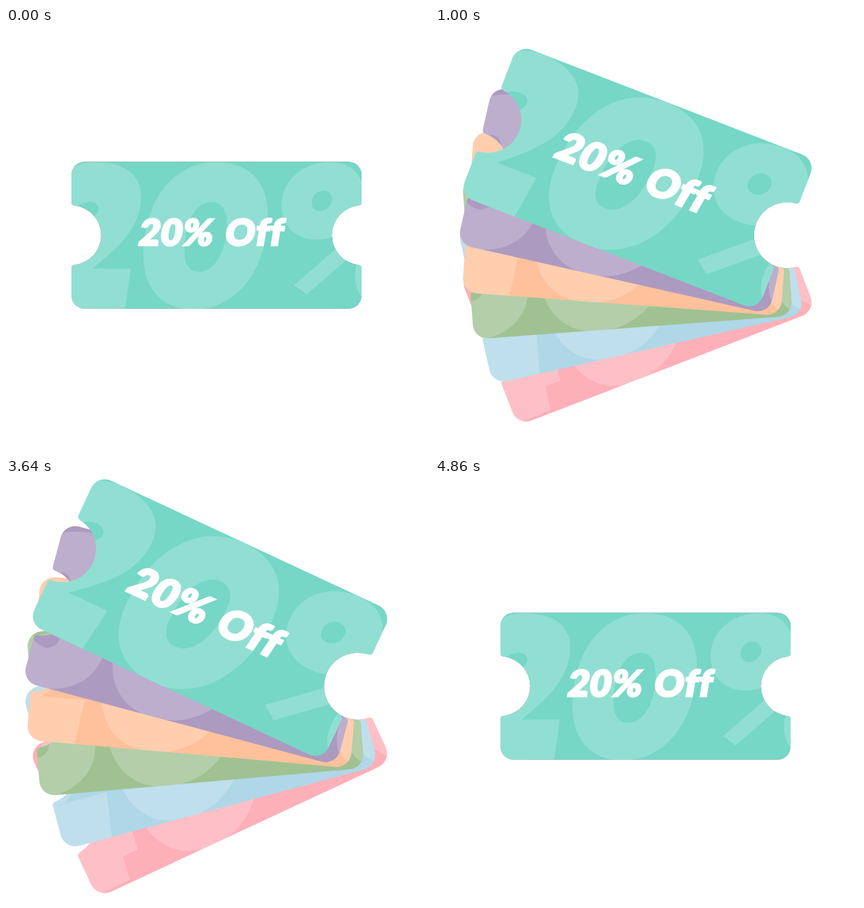
Recreate the animation shown at these times as an HTML page. Size 640 by 640 pixels, loop 6 s.

```html
<!DOCTYPE html>
<html lang="en">
<head>
<meta charset="utf-8">
<title>Coupon fan</title>
<style>
  html, body { margin: 0; width: 100%; height: 100%; overflow: hidden; background: #fff; }
  svg { display: block; width: 100vw; height: 100vh; }
  text {
    font-family: Lato, "Open Sans", sans-serif;
    font-weight: 900;
    font-size: 55px;
    letter-spacing: 1.3px;
    word-spacing: 3px;
    text-anchor: middle;
    text-rendering: geometricPrecision;
    fill: #fff;
    stroke: #fff;
    stroke-width: 2.6px;
    stroke-linejoin: miter;
  }
</style>
</head>
<body>
<svg viewBox="0 0 640 640">
  <defs>
    <path id="ticket" d="M119 202.5H518A20 20 0 0 1 538 222.5V263.5Q538 268 533 268.6
      A45.2 45.2 0 0 0 533 358.4Q538 359 538 363.5V404.5A20 20 0 0 1 518 424.5H119
      A20 20 0 0 1 99 404.5V363.5Q99 359 104 358.4A45.2 45.2 0 0 0 104 268.6Q99 268 99 263.5V222.5
      A20 20 0 0 1 119 202.5Z"/>
    <clipPath id="edge"><use href="#ticket"/></clipPath>
    <path id="two" fill-rule="evenodd" d="M60 250C85 214 108 203 135 203C181 203 204.500 224 204.500 254
      C204.500 305 165 335 131 364H189L180 426H60Z
      M98 276C112 265 120 263 127 263C136 263 140 268 140 273C140 280 134 286 126 293L98 318Z"/>
    <path id="three" fill-rule="evenodd" d="M60 244C90 215 120 206 150 206C182 206 203 222 203 250
      C203 278 190 296 176 304C188 314 196 332 196 355C196 400 160 426 118 426C90 426 70 420 60 412Z
      M102 282A13 14 0 0 1 128 282A13 14 0 0 1 102 282Z
      M94 362C106 372 118 374 124 370C131 366 134 360 133 352C132 340 115 336 94 336Z"/>
    <path id="four" d="M118 203H204L181 345H182L176 388H154L149 421H80V388H60V345Z"/>
    <path id="ring" fill-rule="evenodd" d="M417 268C417 232 448 203 490 203C522 203 541 222 541 252
      C541 290 511 320 470 320C437 320 417 299 417 268Z
      M462.500 264C462.500 254 471 246 481 246C489 246 493.500 251 493.500 259
      C493.500 269 485 277 475 277C467 277 462.500 272 462.500 264Z"/>
    <g id="rest">
      <path fill-rule="evenodd" d="M208 345C208 262 252 203 318 203C367 203 396 232 396 282
        C396 365 349 426 284 426C237 426 208 395 208 345Z
        M270 338C270 298 285 263 311 263C326 263 334 274 334 294C334 335 318 369 292 369
        C277 369 270 358 270 338Z"/>
      <use href="#ring"/>
      <use href="#ring" x="111" y="106"/>
      <path d="M436 389L455 403L600 277L581 263Z"/>
    </g>
  </defs>
  <rect width="640" height="640" fill="#fff"/>
  <g id="fan"></g>
</svg>
<script>
  const LOOP = 6000, STEP = 1000 / 14;
  const START = 394, DURATION = 1220, MIRROR = 5247;
  const PIVOT = { x: 538, y: 313.5 };

  // Back to front: colour, first digit, its shift, shift of the other signs.
  const cards = [
    ["#fdb0b8", "four", 0, -11],
    ["#afd7e8", "two", -15, -14],
    ["#a0c292", "three", -17, -12],
    ["#ffc19b", "two", -16, -14],
    ["#ad9ac0", "three", 0, 0],
    ["#76d7c6", "two", 0, 0]
  ];

  const fan = document.getElementById("fan");
  fan.innerHTML = cards.map(([color, digit, digitX, restX], i) => `
    <g>
      <use href="#ticket" fill="${color}"/>
      <g clip-path="url(#edge)" fill="#fff" fill-opacity=".2">
        <use href="#${digit}" x="${digitX}"/>
        <use href="#rest" x="${restX}"/>
      </g>
      ${i === cards.length - 1 ? '<text transform="translate(308.500 328.700) skewX(-9)">20% Off</text>' : ""}
    </g>`).join("");

  const bezier = (u, a, b) => 3 * (1 - u) * (1 - u) * u * a + 3 * (1 - u) * u * u * b + u * u * u;

  function ease(x) {
    if (x <= 0) return 0;
    if (x >= 1) return 1;
    let low = 0, high = 1;
    for (let i = 0; i < 30; i++) {
      const mid = (low + high) / 2;
      if (bezier(mid, 0, 0.18) < x) low = mid; else high = mid;
    }
    return bezier(low, 0.02, 1);
  }

  // Fourteen pictures a second, each starting on a whole 10 ms.
  function snap(t) {
    let k = Math.floor((t + 5) / STEP);
    if (Math.round(k * STEP / 10) * 10 > t) k--;
    return k * STEP;
  }

  function draw(ms) {
    const t = snap(ms % LOOP);
    const p = ease((Math.min(t, MIRROR - t) - START) / DURATION);
    // The slide to the left runs ahead of the turn.
    const x = PIVOT.x - 6.5 * Math.pow(p, 0.6), scale = 1 + 0.12 * p;
    [...fan.children].forEach((card, i) => {
      const angle = (10 * i - 25) * p;
      card.setAttribute("transform",
        `translate(${x} ${PIVOT.y}) rotate(${angle}) scale(${scale}) translate(${-PIVOT.x} ${-PIVOT.y})`);
    });
  }

  const begin = performance.now();
  function tick() {
    draw(performance.now() - begin);
    requestAnimationFrame(tick);
  }
  tick();
</script>
</body>
</html>
```
